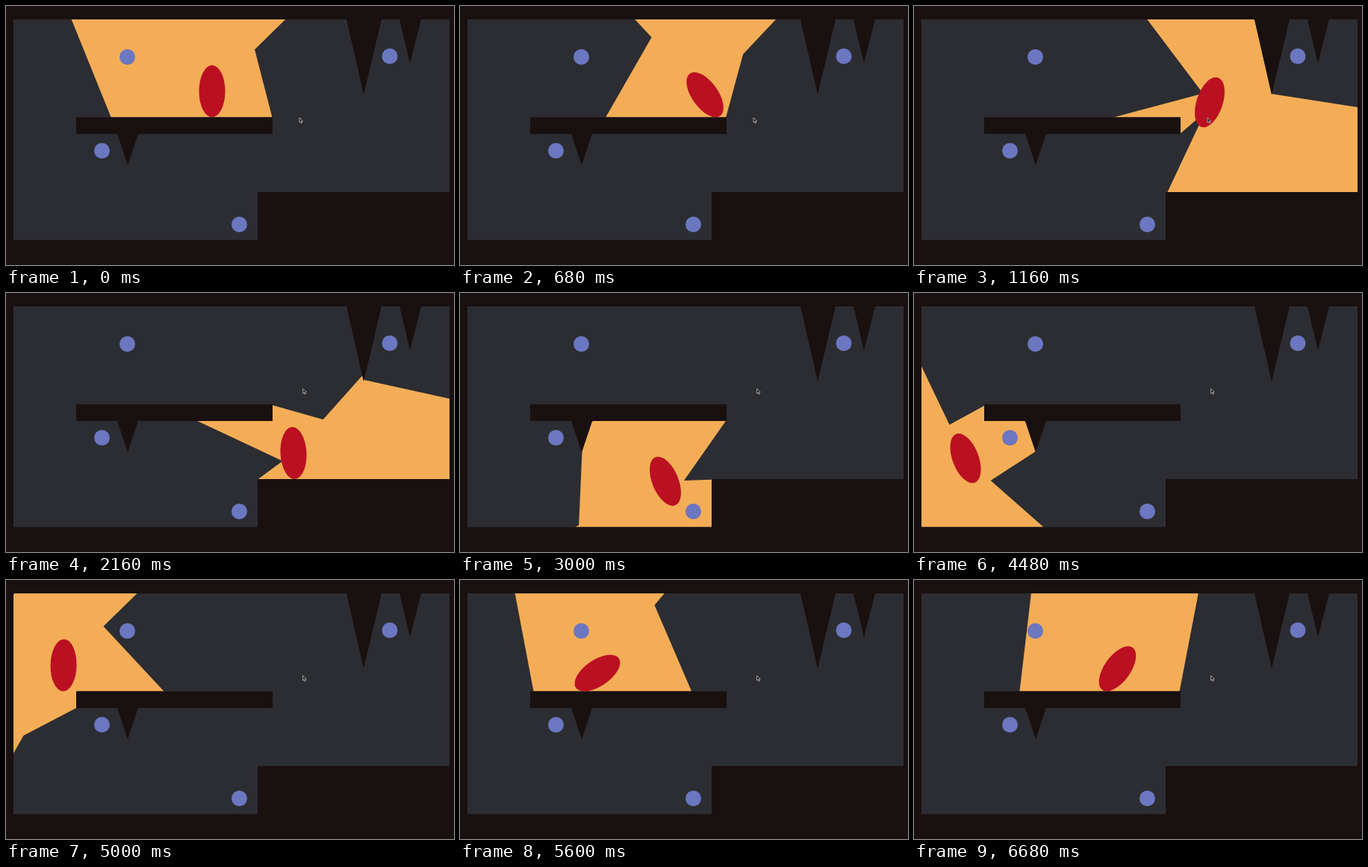
Recreate the animation shown at these times as an HTML page with a canvas. Size 600 px wide and 348 px high, loop 6.72 s.

```html
<!DOCTYPE html>
<html>
<head>
<meta charset="utf-8">
<style>
html, body { margin: 0; width: 100%; height: 100%; overflow: hidden; background: #191010; }
canvas { display: block; }
</style>
</head>
<body>
<canvas id="stage" width="600" height="348"></canvas>
<script>
const ctx = document.getElementById('stage').getContext('2d');
const LOOP = 6720, TICK = 40, RANGE = 140, RAYS = 360;
const RX = 17.5, RY = 35, GRAVITY = 0.0002;
const TOP = 149.5, SHELF = 250, PIT = 314.5;
const RAD = Math.PI / 180;
const WALL = '#191010', ROOM = '#2c2d32', LIGHT = '#f4ad56', BODY = '#bb1022', DOT = '#6b77c0';

const room = [[10, 18], [456, 18], [479, 119], [503, 18], [527, 18], [541, 77], [556, 18],
  [594, 18], [594, SHELF], [337, SHELF], [337, PIT], [10, PIT]];
const ledge = [[94, TOP], [357, TOP], [357, 172], [177, 172], [163, 214], [149, 172], [94, 172]];
const dots = [[162.5, 68.5], [128.5, 194.5], [312.5, 293.5], [514, 67.5]];

// key points as [time, value]
const across = [[0, 276], [760, 336], [1160, 396], [1600, 417], [2160, 385], [3000, 275],
  [4480, 69], [4800, 62], [5600, 184], [6680, 272.5]];
const turning = [[0, 0], [1160, 198.6], [2160, 177], [3000, -22.5], [4480, -381],
  [5600, -304.5], [6680, -144.5]];
const leftKink = [[0, 347], [1160, 15], [2160, 18], [3000, 130], [4480, 50], [5600, 181], [6680, 166]];
const rightKink = [[0, 80], [2160, 60], [3000, 25], [4480, 45], [5600, 119], [6680, 164]];

const edgesOf = (shape, onLedge) =>
  shape.map((a, i) => ({ a, b: shape[(i + 1) % shape.length], onLedge }));
const edges = [...edgesOf(room, false), ...edgesOf(ledge, true)];

const slope = (p, q) => (q[1] - p[1]) / (q[0] - p[0]);

function tangent(keys, i) {
  const last = keys.length - 1;
  if (i === 0) return slope(keys[0], keys[1]);
  if (i === last) return slope(keys[last - 1], keys[last]);
  const u = slope(keys[i - 1], keys[i]), v = slope(keys[i], keys[i + 1]);
  return u * v > 0 ? 2 * u * v / (u + v) : 0;
}

// smooth curve through the keys without overshoot
function track(keys, t) {
  const next = keys.findIndex(k => k[0] > t);
  if (next < 0) return keys[keys.length - 1][1];
  const i = next - 1, [t0, v0] = keys[i], [t1, v1] = keys[next];
  const h = t1 - t0, s = (t - t0) / h, r = 1 - s;
  return v0 * r * r * (1 + 2 * s) + v1 * s * s * (3 - 2 * s)
    + h * s * r * (tangent(keys, i) * r - tangent(keys, next) * s);
}

const fall = (t, start, from, floor) =>
  Math.min(floor, from + GRAVITY * Math.max(0, t - start) ** 2);

// lowest point of the body: two drops, then a leap back up
function foot(t) {
  if (t < 2576) return fall(t, 900, TOP, SHELF);
  if (t < 4120) return fall(t, 2576, SHELF, PIT);
  const s = Math.min(1, (t - 4120) / 890);
  return PIT + (TOP - PIT) * s * s * (3 - 2 * s);
}

function pose(t) {
  const turn = track(turning, t) * RAD;
  const half = Math.hypot(RY * Math.cos(turn), RX * Math.sin(turn));
  return { x: track(across, t), y: foot(t) - half, turn };
}

function castRay(x, y, angle) {
  const dx = Math.cos(angle), dy = Math.sin(angle);
  const hit = { angle, d: Infinity, onLedge: false };
  for (const { a, b, onLedge } of edges) {
    const ex = b[0] - a[0], ey = b[1] - a[1], det = dx * ey - dy * ex;
    if (Math.abs(det) < 1e-9) continue;
    const px = a[0] - x, py = a[1] - y;
    const d = (px * ey - py * ex) / det, s = (px * dy - py * dx) / det;
    if (d > 0 && s >= 0 && s <= 1 && d < hit.d) Object.assign(hit, { d, onLedge });
  }
  return hit;
}

// the rays turn with the body; open gaps close with a kink
function lightShape(t, { x, y, turn }) {
  const step = 2 * Math.PI / RAYS;
  const at = (angle, d) => [x + Math.cos(angle) * d, y + Math.sin(angle) * d];
  const hits = Array.from({ length: RAYS }, (_, i) => castRay(x, y, turn + (i + 0.5) * step))
    .filter(hit => hit.d <= RANGE);
  const shape = [];
  hits.forEach((hit, i) => {
    shape.push(at(hit.angle, hit.d));
    const next = hits[(i + 1) % hits.length];
    const gap = next.angle - hit.angle + (next.angle > hit.angle ? 0 : 2 * Math.PI);
    if (gap < step * 4) return;
    if (!hit.onLedge && !next.onLedge) {
      shape.push(at(8 * RAD, 1500));
      return;
    }
    const side = Math.cos(hit.angle + gap / 2) < 0 ? leftKink : rightKink;
    shape.push(at(hit.onLedge ? next.angle : hit.angle, track(side, t)));
  });
  return shape;
}

function trace(points) {
  ctx.beginPath();
  for (const [x, y] of points) ctx.lineTo(x, y);
  ctx.closePath();
}

function fill(points, color) {
  ctx.fillStyle = color;
  trace(points);
  ctx.fill();
}

function oval(x, y, rx, ry, turn, color) {
  ctx.fillStyle = color;
  ctx.beginPath();
  ctx.ellipse(x, y, rx, ry, turn, 0, Math.PI * 2);
  ctx.fill();
}

function cursor(x, y) {
  fill([[x, y], [x, y + 6.5], [x + 1.5, y + 5.2], [x + 2.6, y + 7.6],
    [x + 3.6, y + 7.1], [x + 2.6, y + 4.8], [x + 4.5, y + 4.6]], '#151515');
  ctx.strokeStyle = '#c8c8c8';
  ctx.lineWidth = 0.8;
  ctx.stroke();
}

function draw(t) {
  const body = pose(t);
  ctx.fillStyle = WALL;
  ctx.fillRect(0, 0, 600, 348);
  fill(room, ROOM);
  ctx.save();
  trace(room);
  ctx.clip();
  fill(lightShape(t, body), LIGHT);
  ctx.restore();
  fill(ledge, WALL);
  for (const [x, y] of dots) oval(x, y, 10.5, 10.5, 0, DOT);
  oval(body.x, body.y, RX, RY, body.turn, BODY);
  if (t < 1440) cursor(393, 150);
  else cursor(397.7, 128.5);
}

let start = null, shown = -1;
function frame(now) {
  if (start === null) start = now;
  let t = Math.floor(((now - start) % LOOP) / TICK) * TICK;
  if (t < 2 * TICK) t = 0;
  if (t !== shown) draw(shown = t);
  requestAnimationFrame(frame);
}
draw(0);
requestAnimationFrame(frame);
</script>
</body>
</html>
```
